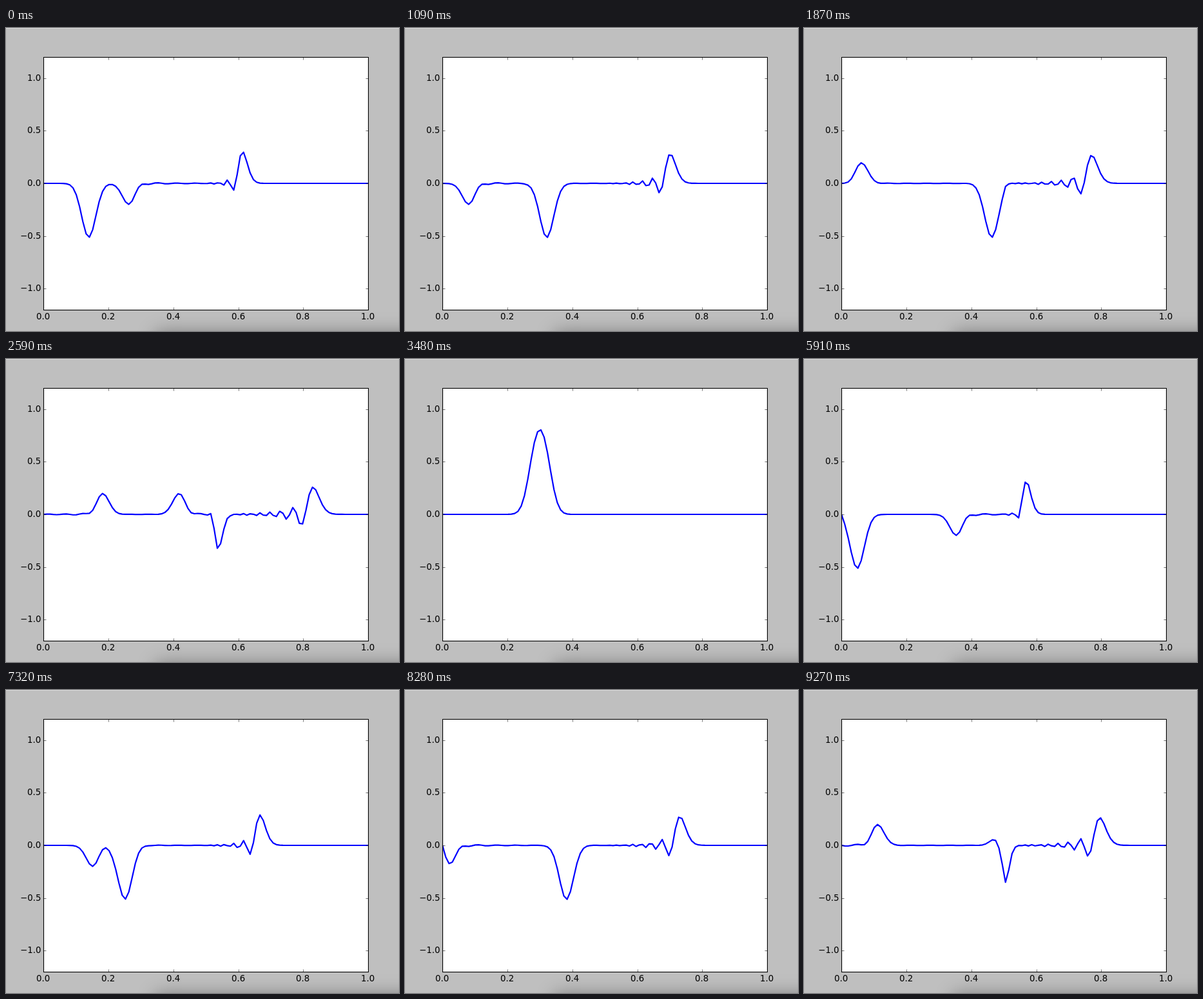
An HTML page with a canvas for the animation above (9330 ms loop, 610 by 470 pixels).

```html
<!DOCTYPE html>
<html>
<head>
<meta charset="utf-8">
<style>
  html, body { margin: 0; width: 100%; height: 100%; overflow: hidden; background: #bfbfbf; }
  canvas { display: block; }
</style>
</head>
<body>
<canvas id="stage" width="610" height="470"></canvas>
<script>
const ctx = document.getElementById('stage').getContext('2d');
const LOOP = 9330, POINTS = 100, STEPS = 100;
const FRAME = [58.5, 45.5, 504, 392];
const [LEFT, TOP, WIDTH, HEIGHT] = FRAME;
const toX = x => 58.2 + x * WIDTH;
const toY = y => 241 - y * HEIGHT / 2.4;

// Simulation pace: time in ms and the step reached; steps wrap after STEPS.
const PACE = [[0, 44], [2590, 88], [4460, 117], [5910, 135], [7320, 155], [LOOP, 182]];

// Wave equation with fixed ends; the wave speed halves at x = 0.5.
function simulate() {
  const start = Array.from({ length: POINTS }, (_, i) =>
    Math.exp(-1000 * (i / (POINTS - 1) - 0.3) ** 2));
  const states = [start, start];
  for (let n = 1; n < STEPS; n++) {
    const u = states[n], before = states[n - 1];
    states.push(u.map((v, i) => {
      if (i === 0 || i === POINTS - 1) return 0;
      const courant = i < POINTS / 2 ? 1 : 0.5;
      return 2 * v - before[i] + courant ** 2 * (u[i + 1] - 2 * v + u[i - 1]);
    }));
  }
  return states;
}
const states = simulate();

function stepAt(t) {
  const next = PACE.findIndex(([time]) => time > t);
  const [t0, n0] = PACE[next - 1], [t1, n1] = PACE[next];
  const step = Math.floor(n0 + (n1 - n0) * (t - t0) / (t1 - t0) + 0.4);
  return (step - 1) % STEPS + 1;
}

function drawBackground() {
  ctx.fillStyle = '#bfbfbf';
  ctx.fillRect(0, 0, 610, 470);
  ctx.fillStyle = '#dcdcdc';
  ctx.fillRect(0, 0, 610, 1);
  // Soft shadow rising from below the stage
  ctx.save();
  ctx.shadowColor = 'rgba(0,0,0,0.36)';
  ctx.shadowBlur = 26;
  ctx.fillRect(232, 472, 500, 100);
  ctx.restore();
  ctx.fillStyle = '#fff';
  ctx.fillRect(...FRAME);
}

function drawCurve(u) {
  ctx.save();
  ctx.beginPath();
  ctx.rect(...FRAME);
  ctx.clip();
  ctx.beginPath();
  u.forEach((v, i) => ctx.lineTo(toX(i / (POINTS - 1)), toY(v)));
  ctx.strokeStyle = '#00f';
  ctx.lineWidth = 2.2;
  ctx.lineJoin = 'round';
  ctx.stroke();
  ctx.restore();
}

function line(x, y, dx, dy) {
  ctx.beginPath();
  ctx.moveTo(x, y);
  ctx.lineTo(x + dx, y + dy);
  ctx.stroke();
}

// Places text on whole pixels; align is the part of its width left of x.
function label(value, x, baseline, align) {
  const text = value.toFixed(1).replace('-', '\u2212');
  ctx.fillText(text, Math.floor(x - align * ctx.measureText(text).width), baseline);
}

function drawAxes() {
  ctx.strokeStyle = ctx.fillStyle = '#000';
  ctx.lineWidth = 1.1;
  ctx.strokeRect(...FRAME);
  ctx.font = '13.33px "DejaVu Sans", sans-serif';
  ctx.lineWidth = 0.55;
  for (let i = 0; i <= 5; i++) {
    const x = Math.round(toX(i / 5));
    line(x + 0.5, TOP, 0, 4);
    line(x + 0.5, TOP + HEIGHT, 0, -4);
    label(i / 5, toX(i / 5), 452, 0.5);
  }
  for (let i = -2; i <= 2; i++) {
    const y = Math.round(toY(i / 2));
    line(LEFT, y + 0.5, 4, 0);
    line(LEFT + WIDTH, y + 0.5, -4, 0);
    label(i / 2, 54.5, y + 4, 1);
  }
}

function frame() {
  drawBackground();
  drawCurve(states[stepAt(performance.now() % LOOP)]);
  drawAxes();
  requestAnimationFrame(frame);
}
frame();
</script>
</body>
</html>
```
